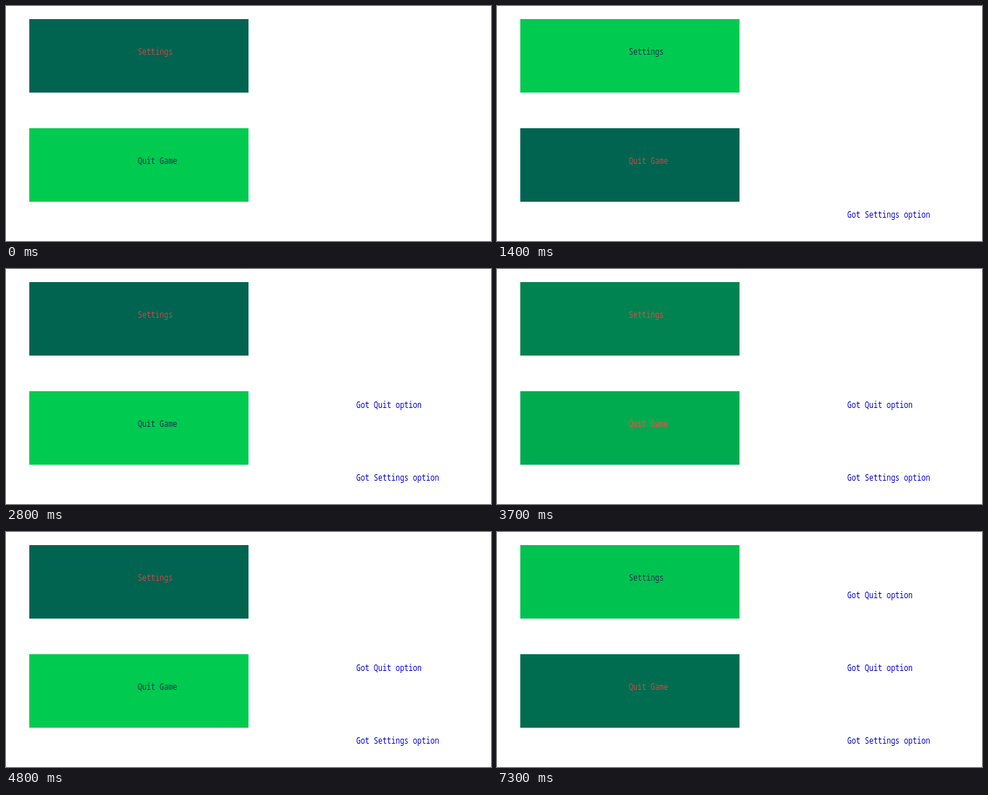
Write an HTML page that moves like this. It is 666 by 323 pixels and loops after 8 s.

```html
<!DOCTYPE html>
<html lang="en">
<head>
<meta charset="utf-8">
<title>Menu</title>
<style>
  html, body { margin: 0; width: 100%; height: 100%; overflow: hidden; background: #fff; }
  svg { display: block; }
  text { font: 10px "Noto Sans Mono", "DejaVu Sans Mono", monospace; white-space: pre; }
</style>
</head>
<body>
<svg id="stage" width="666" height="323" viewBox="0 0 666 323"></svg>
<script>
const LOOP = 8000;
const stage = document.getElementById("stage");

function add(tag, attributes, content = "") {
  const node = document.createElementNS("http://www.w3.org/2000/svg", tag);
  for (const [key, value] of Object.entries(attributes)) node.setAttribute(key, value);
  node.textContent = content;
  return stage.appendChild(node);
}

// The lettering is a tall, narrow terminal face.
function addText(x, baseline, content, fill) {
  return add("text", { transform: `translate(${x} ${baseline}) scale(1 1.25)`, fill }, content);
}

function addButton(y, content) {
  return {
    box: add("rect", { x: 32, y, width: 301, height: 101 }),
    label: addText(181, y + 49, content)
  };
}

function addMessage(start, baseline, content) {
  return { start, node: addText(481, baseline, content, "#0000dc") };
}

const settings = addButton(18, "Settings");
const quit = addButton(168, "Quit Game");
const messages = [
  addMessage(1400, 291, "Got Settings option"),
  addMessage(2800, 191, "Got Quit option"),
  addMessage(5800, 91, "Got Quit option")
];

// [time, how far the selection has moved to Settings]
const selection = [
  [0, 0], [500, 0.3], [800, 1],
  [2200, 0.7], [2500, 0],
  [3700, 0.3], [3800, 0.85],
  [4800, 0], [7300, 0.92]
];

function paint({ box, label }, amount) {
  const green = Math.round(100 + 102 * amount);
  const red = Math.round(200 + 80 * amount);
  box.setAttribute("fill", `rgb(0, ${green}, 80)`);
  label.setAttribute("fill", amount > 0.8 ? "#1c3050" : `rgb(${Math.min(red, 255)}, 70, 72)`);
}

function draw(now) {
  const time = now % LOOP;
  const amount = selection.findLast(([start]) => start <= time)[1];
  paint(settings, amount);
  paint(quit, 1 - amount);
  for (const { start, node } of messages) {
    node.setAttribute("visibility", time >= start ? "visible" : "hidden");
  }
}

function tick() {
  draw(performance.now());
  requestAnimationFrame(tick);
}
tick();
</script>
</body>
</html>
```
